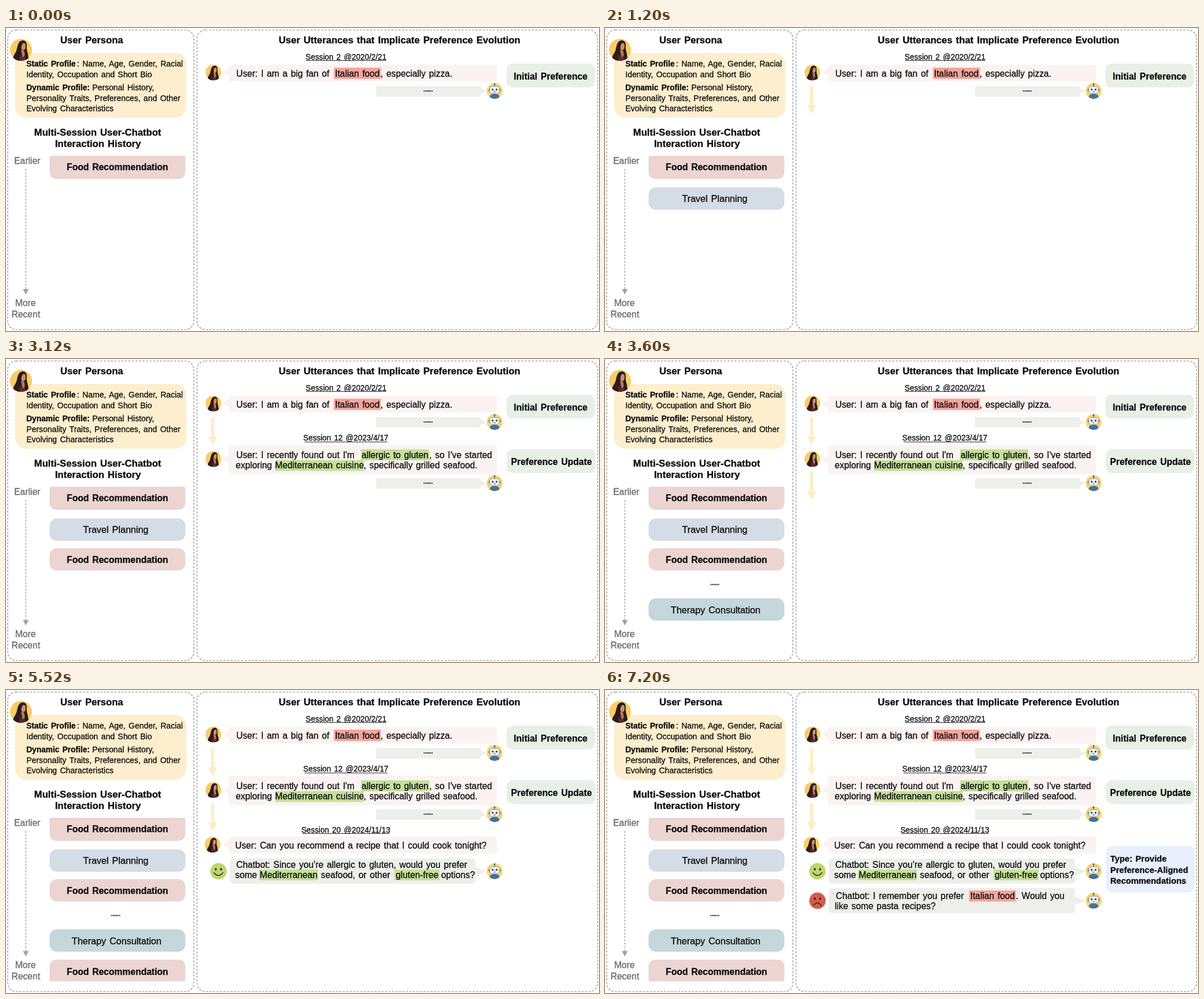
Write an HTML page that moves like this. It is 1048 by 535 pixels and loops after 8000 ms.

```html
<!DOCTYPE html>
<html lang="en">
<head>
<meta charset="utf-8">
<title>Preference evolution</title>
<style>
  html, body { margin: 0; width: 100%; height: 100%; overflow: hidden; background: #fff; }
  svg { display: block; width: 1048px; height: 535px; }
  text {
    font: 15.8px "Liberation Sans", Arial, sans-serif; word-spacing: 1.5px; white-space: pre;
    fill: #0c0c0c; stroke: #0c0c0c; stroke-width: .3px; stroke-linejoin: round;
  }
  .mid { text-anchor: middle; }
  .title, .label, .type, .dots, .bold { font-weight: bold; }
  .title { font-size: 17px; }
  .label { font-size: 16px; }
  .type { font-size: 15px; }
  .topic { font-size: 16.5px; }
  .small { font-size: 14.3px; }
  .small.bold { font-size: 14px; }
  .session { font-size: 13.8px; }
  .dots { font-size: 10px; }
  .axis { font-size: 16px; fill: #666; stroke: #666; }
  .panel { fill: none; stroke: #a3a3a3; stroke-width: 1.6; stroke-dasharray: 3.6 2.6; }
  .rule { stroke: #222; stroke-width: 1; }
  .food { fill: #ecd5d1; }
  .travel { fill: #d4dce6; }
  .therapy { fill: #c4d7da; }
  .user { fill: #fbf3f2; }
  .bot { fill: #eeefea; }
  .old { fill: #f4a59c; }
  .new { fill: #c3e099; }
  .tag { fill: #e8f0e5; }
  .step { animation: 8s step-end infinite; }
  #travel { animation-name: at1; }
  #update { animation-name: at2; }
  #therapy { animation-name: at3; }
  #request { animation-name: at4; }
  #mistake { animation-name: at5; }
  #type { animation-name: at6; }
  @keyframes at1 { 0% { opacity: 0 } 15%, 100% { opacity: 1 } }
  @keyframes at2 { 0% { opacity: 0 } 30%, 100% { opacity: 1 } }
  @keyframes at3 { 0% { opacity: 0 } 45%, 100% { opacity: 1 } }
  @keyframes at4 { 0% { opacity: 0 } 60%, 100% { opacity: 1 } }
  @keyframes at5 { 0% { opacity: 0 } 75%, 100% { opacity: 1 } }
  @keyframes at6 { 0% { opacity: 0 } 90%, 100% { opacity: 1 } }
</style>
</head>
<body>
<svg viewBox="0 0 1048 535">
  <defs>
    <clipPath id="disc"><circle r="14"/></clipPath>
    <g id="woman" clip-path="url(#disc)">
      <circle r="14" fill="#f8cc66"/>
      <path d="M-10 14C-11 9-8 6-6 2C-4-2-5-11 2-12C7-12 8-7 7-3C7 2 10 5 9 14Z" fill="#2b1b1b"/>
      <path d="M0 0L4 1L5 7L2 10Z" fill="#b57c60"/>
      <ellipse cx="3.200" cy="-4" rx="2.800" ry="4.600" transform="rotate(10 3 -4)" fill="#c9906f"/>
      <path d="M-10 14C-9 9-5 7-1 6L2 11L5 6C9 7 10 10 11 14Z" fill="#65262e"/>
      <path d="M3-11C0-8 1-2-1 3C-3 7-1 10-2 14H-9C-11 9-8 6-6 2C-4-2-5-11 3-11Z" fill="#2b1b1b"/>
      <path d="M6-7C5-1 7 3 5 8L6 14H9C10 7 7 3 7-3Z" fill="#2b1b1b"/>
    </g>
    <g id="robot">
      <circle r="14" fill="#f9d373"/>
      <path d="M0-7V-12" stroke="#43586e" stroke-width="1.200"/>
      <circle cy="-12.300" r="1.400" fill="#43586e"/>
      <path d="M-8.500 11.100C-8.500 7 -6 5 0 5S8.500 7 8.500 11.100A14 14 0 0 1-8.500 11.100Z" fill="#42729b"/>
      <rect x="-10.500" y="-4.500" width="21" height="5.500" rx="2" fill="#57789a"/>
      <rect x="-8.800" y="-8" width="17.600" height="12.500" rx="5.500" fill="#f4f6f7" stroke="#738798" stroke-width=".8"/>
      <circle cx="-3.500" cy="-2.500" r="1.700" fill="#2d4257"/>
      <circle cx="3.500" cy="-2.500" r="1.700" fill="#2d4257"/>
      <path d="M-2 1Q0 2.700 2 1" fill="none" stroke="#2d4257"/>
    </g>
    <g id="reply">
      <path class="bot" d="M656 0H837Q839 0 839 2V4L849 9L839 14V16Q839 18.500 837 18.500H656Q654 18.500 654 16.500V2Q654 0 656 0Z"/>
      <text class="dots mid" x="746" y="9.500">......</text>
      <use href="#robot" x="863.500" y="8.700"/>
    </g>
    <path id="down" d="M362.300 0H368V33.500H373.500L365.200 48.500L357 33.500H362.300Z" fill="#feeec6"/>
    <g id="eyes" fill="#222">
      <ellipse cx="-4.700" cy="-3.500" rx="1.500" ry="2.200"/>
      <ellipse cx="4.700" cy="-3.500" rx="1.500" ry="2.200"/>
    </g>
    <g id="answer" class="bot">
      <rect x="395.500" width="435" height="44.500" rx="6"/>
      <path d="M830 15L849 23L830 31Z"/>
      <use href="#robot" x="863.500" y="22.500"/>
    </g>
  </defs>

  <rect class="panel" x="3" y="3.500" width="329" height="529" rx="15"/>
  <rect class="panel" x="337.500" y="3.500" width="708" height="529" rx="15"/>

  <text class="title mid" x="151.500" y="27">User Persona</text>
  <rect x="16" y="44" width="303" height="114.500" rx="20" fill="#fdeecd"/>
  <use href="#woman" transform="translate(26.500 38.500) scale(1.400)"/>
  <text class="small bold" x="36" y="68">Static Profile</text>
  <text class="small" x="125.500" y="68">: Name, Age, Gender, Racial</text>
  <text class="small" x="36" y="87">Identity, Occupation and Short Bio</text>
  <text class="small bold" x="36" y="109.500">Dynamic Profile:</text>
  <text class="small" x="152.500" y="109.500">Personal History,</text>
  <text class="small" x="36" y="128.500">Personality Traits, Preferences, and Other</text>
  <text class="small" x="36" y="147">Evolving Characteristics</text>

  <text class="title mid" x="162" y="189.500">Multi-Session User-Chatbot</text>
  <text class="title mid" x="162.500" y="209.500">Interaction History</text>
  <text class="axis mid" x="37.500" y="240">Earlier</text>
  <text class="axis mid" x="34.500" y="491">More</text>
  <text class="axis mid" x="35" y="511">Recent</text>
  <path d="M35 249V461" stroke="#a3a3a3" stroke-width="1.500" stroke-dasharray="3.200 2.600"/>
  <path d="M30 461H40L35 470.500Z" fill="#a0a0a0"/>

  <path class="food" d="M79.500 225.500H314.500Q317 225.500 317 230V253Q317 266.500 303 266.500H91Q77 266.500 77 253V230Q77 225.500 79.500 225.500Z"/>
  <text class="label mid" x="197" y="251">Food Recommendation</text>

  <text class="title mid" x="695.500" y="26.500">User Utterances that Implicate Preference Evolution</text>
  <text class="session mid" x="601" y="56">Session 2 @2020/2/21</text>
  <path class="rule" d="M530 57.500H672"/>
  <use href="#woman" x="366.500" y="78.500"/>
  <rect class="user" x="394" y="65" width="474" height="29.500" rx="4"/>
  <path class="user" d="M395 70L383 78L395 86Z"/>
  <rect class="old" x="579.500" y="70" width="83" height="20"/>
  <text x="407" y="85.500">User: I am a big fan of</text>
  <text class="mid" x="621" y="85.500">Italian food</text>
  <text x="662" y="85.500">, especially pizza.</text>
  <use href="#reply" y="102.500"/>
  <rect class="tag" x="884.500" y="63" width="156.500" height="42" rx="11"/>
  <text class="label mid" x="962.500" y="91">Initial Preference</text>

  <g id="travel" class="step">
    <use href="#down" y="103"/>
    <rect class="travel" x="77" y="281.500" width="240" height="39.500" rx="13"/>
    <text class="topic mid" x="194" y="307">Travel Planning</text>
  </g>

  <g id="update" class="step">
    <rect class="food" x="77" y="334" width="240" height="39.500" rx="13"/>
    <text class="label mid" x="197" y="359.500">Food Recommendation</text>
    <text class="session mid" x="600.500" y="144">Session 12 @2023/4/17</text>
    <path class="rule" d="M527.500 146.500H674"/>
    <use href="#woman" x="366.500" y="176.500"/>
    <rect class="user" x="394" y="152" width="474" height="51.500" rx="5"/>
    <path class="user" d="M395 169L383 177L395 185Z"/>
    <rect class="new" x="627.500" y="159.500" width="120.500" height="19.500"/>
    <rect class="new" x="476" y="178.500" width="156" height="19"/>
    <text x="407" y="174.500">User: I recently found out I'm</text>
    <text class="mid" x="687.500" y="174.500">allergic to gluten</text>
    <text x="748" y="174.500">, so I've started</text>
    <text x="406" y="193">exploring</text>
    <text class="mid" x="554" y="193">Mediterranean cuisine</text>
    <text x="632" y="193">, specifically grilled seafood.</text>
    <use href="#reply" y="210.500"/>
    <rect class="tag" x="885" y="159" width="157" height="42.500" rx="11"/>
    <text class="label mid" x="964" y="186.500">Preference Update</text>
  </g>

  <g id="therapy" class="step">
    <use href="#down" y="200"/>
    <text class="dots mid" x="194" y="398.500">......</text>
    <rect class="therapy" x="77" y="422.500" width="240" height="39.500" rx="13"/>
    <text class="topic mid" x="195.500" y="448.500">Therapy Consultation</text>
  </g>

  <g id="request" class="step">
    <path class="food" d="M91 476H303Q317 476 317 489V511Q317 514.500 314.500 514.500H79.500Q77 514.500 77 511V489Q77 476 91 476Z"/>
    <text class="label mid" x="197" y="502.500">Food Recommendation</text>
    <text class="session mid" x="600.500" y="251.500">Session 20 @2024/11/13</text>
    <path class="rule" d="M523.500 253.500H678"/>
    <use href="#woman" x="365" y="273"/>
    <rect class="user" x="394" y="259" width="474" height="29.500" rx="4"/>
    <path class="user" d="M395 265L383 273L395 281Z"/>
    <text x="405" y="280">User: Can you recommend a recipe that I could cook tonight?</text>
    <circle cx="375.500" cy="320" r="14.500" fill="#bfd66c"/>
    <use href="#eyes" x="375.500" y="320"/>
    <path d="M367.500 322.500Q375.500 332.500 383.500 322.500" fill="none" stroke="#222" stroke-width="1.400" stroke-linecap="round"/>
    <use href="#answer" y="297.500"/>
    <rect class="new" x="447" y="317" width="104" height="19"/>
    <rect class="new" x="686.500" y="317" width="79.500" height="19"/>
    <text x="407" y="314">Chatbot: Since you’re allergic to gluten, would you prefer</text>
    <text x="405" y="332">some</text>
    <text class="mid" x="499.500" y="332">Mediterranean</text>
    <text x="556.500" y="332">seafood, or other</text>
    <text class="mid" x="726.500" y="332">gluten-free</text>
    <text x="769" y="332">options?</text>
  </g>

  <g id="mistake" class="step">
    <circle cx="375.500" cy="372" r="14.500" fill="#d65b4d"/>
    <use href="#eyes" x="375.500" y="372"/>
    <path d="M368.500 380.500Q375.500 371.500 382.500 380.500" fill="none" stroke="#222" stroke-width="1.400" stroke-linecap="round"/>
    <use href="#answer" y="349.500"/>
    <rect class="old" x="643.500" y="354" width="82.500" height="19.500"/>
    <text x="408" y="369">Chatbot: I remember you prefer</text>
    <text class="mid" x="685" y="369">Italian food</text>
    <text x="726" y="369">. Would you</text>
    <text x="406" y="387">like some pasta recipes?</text>
  </g>

  <g id="type" class="step">
    <rect x="885.500" y="275.500" width="156.500" height="82" rx="11" fill="#e8effd"/>
    <text class="type" x="893" y="303">Type: Provide</text>
    <text class="type" x="893" y="322.500">Preference-Aligned</text>
    <text class="type" x="893" y="342">Recommendations</text>
  </g>
</svg>
</body>
</html>
```
